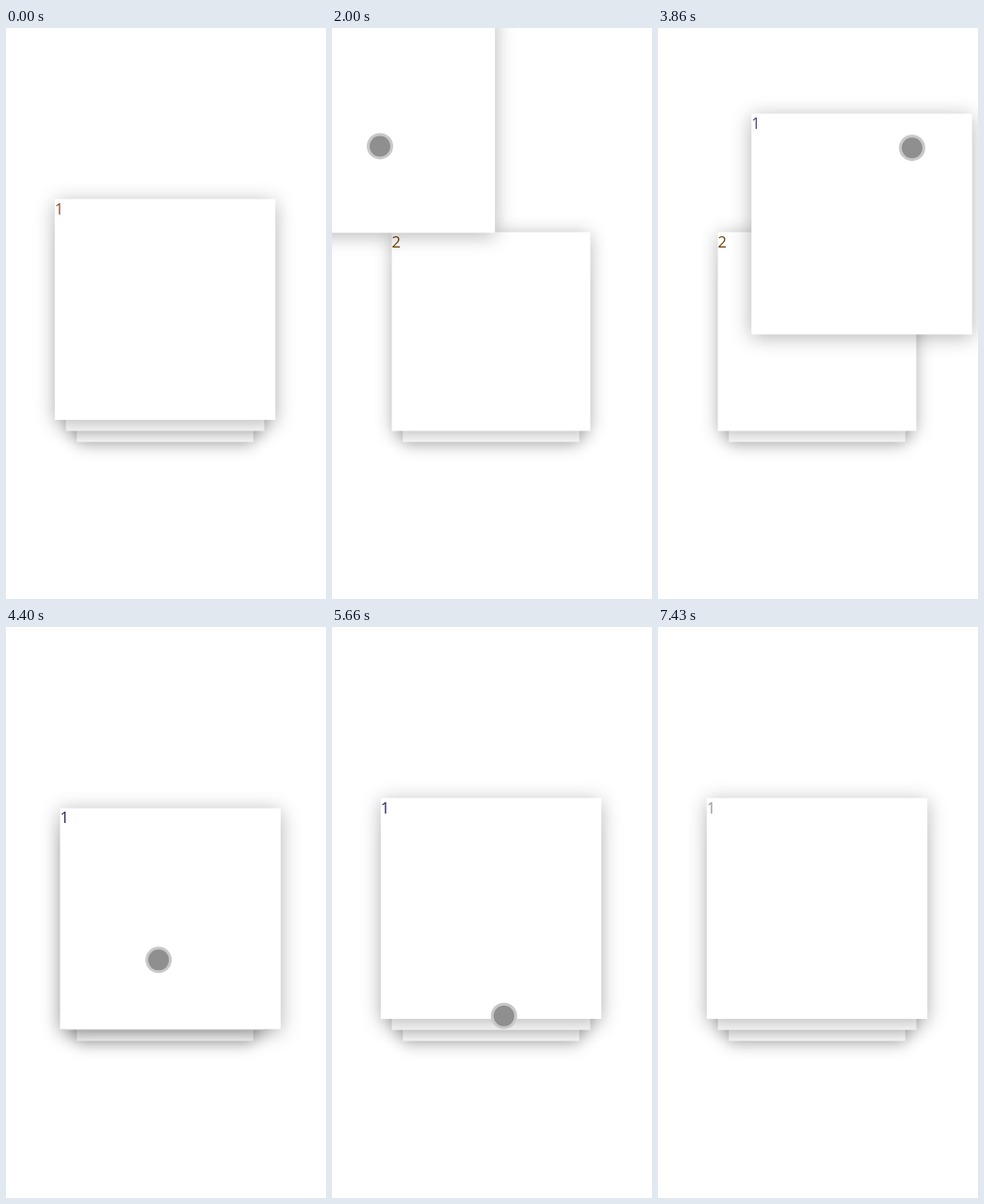
Recreate the animation shown at these times as an HTML page with a canvas. Size 340 by 606 pixels, loop 8210 ms.

```html
<!DOCTYPE html>
<html lang="en">
<head>
<meta charset="utf-8">
<title>Draggable card stack</title>
<style>
  html, body { margin: 0; width: 100%; height: 100%; overflow: hidden; background: #fff; }
  canvas { display: block; }
</style>
</head>
<body>
<canvas id="stage" width="340" height="606"></canvas>
<script>
const ctx = document.getElementById('stage').getContext('2d');
const LOOP = 8210, STEP = 77, RETURN_MS = 400;
const CARD = 234.4, CENTER_X = 169, CENTER_Y = 298.7;
const BROWN = '#96482e', OCHRE = '#6e4408', GRAY = '#999';

// Each drag: grab point, pull vector, and the times of press, full reach,
// release, and the pointer's arrival at the next grab point.
const drags = [
  { grab: [164, 324], pull: [-123, -216], down: 1240, reach: 2070, up: 2440, next: 2820, ink: '#777' },
  { grab: [144.5, 367], pull: [153, -292], down: 2930, reach: 3390, up: 3688, next: 4260, ink: '#4a4a82' },
  { grab: [156.5, 342.5], pull: [125.5, 242.5], down: 4320, reach: 4860, up: 5082, next: 5880, ink: '#26265c' },
  { grab: [150, 356], pull: [-161.5, 273.5], down: 5890, reach: 6314, up: 6700, ink: GRAY }
];

const mix = (a, b, k) => a.map((v, i) => v + (b[i] - v) * k);
const shift = (a, b, k) => a.map((v, i) => v + b[i] * k);

function ramp(t, start, end) {
  const u = Math.min(1, Math.max(0, (t - start) / (end - start)));
  return u * u * (3 - 2 * u);
}

// CSS "ease", cubic-bezier(.25, .1, .25, 1), solved by bisection
function ease(x) {
  if (x >= 1) return 1;
  let low = 0, high = 1, s;
  for (let i = 0; i < 24; i++) {
    s = (low + high) / 2;
    if (0.75 * s * (1 - s) + s ** 3 < x) low = s; else high = s;
  }
  return 0.3 * s * (1 - s) ** 2 + 3 * (1 - s) * s * s + s ** 3;
}

function approach(t) {
  let p = shift([213, 451], [-45, -132], ramp(t, 0, 370));
  p = shift(p, [5, -11], ramp(t, 460, 680));
  p = shift(p, [-9, 10], ramp(t, 840, 990));
  return shift(p, [0, 6], ramp(t, 1155, 1232));
}

function leave(t) {
  return shift([121, 552], [256, 96], (t - 7280) / 150);
}

function pointerAt(t, drag) {
  if (t >= 7280) return leave(t);
  if (!drag) return approach(t);
  const held = shift(drag.grab, drag.pull, ramp(t, drag.down, drag.reach));
  const following = drags[drags.indexOf(drag) + 1];
  return following ? mix(held, following.grab, ramp(t, drag.up, drag.next)) : held;
}

function cardOffset(t, drag) {
  if (!drag) return [0, 0];
  const back = t > drag.up ? ease((t - drag.up) / RETURN_MS) : 0;
  return shift([0, 0], drag.pull, ramp(t, drag.down, drag.reach) * (1 - back));
}

function drawCard(depth, [dx, dy], label, ink) {
  const scale = 1 - depth / 10, size = CARD * scale;
  const x = CENTER_X - size / 2 + dx;
  const y = CENTER_Y - size / 2 + depth * CARD / 10 + dy;
  ctx.save();
  ctx.shadowColor = 'rgba(0, 0, 0, .3)';
  ctx.shadowBlur = 20 * scale;
  ctx.shadowOffsetY = 3 * scale;
  ctx.fillStyle = '#fff';
  ctx.fillRect(x, y, size, size);
  ctx.restore();
  ctx.font = '16.5px "Open Sans", sans-serif';
  ctx.fillStyle = ink;
  ctx.fillText(label, x, y + 16);
}

function drawDisc([x, y], radius, color) {
  ctx.fillStyle = color;
  ctx.beginPath();
  ctx.arc(x, y, radius, 0, Math.PI * 2);
  ctx.fill();
}

function render() {
  const t = Math.floor(performance.now() % LOOP / STEP) * STEP;
  const drag = drags.filter(d => d.down <= t).pop();
  ctx.fillStyle = '#fff';
  ctx.fillRect(0, 0, 340, 606);
  drawCard(2, [0, 0], '', GRAY);
  drawCard(1, [0, 0], '2', drag === drags[3] ? GRAY : OCHRE);
  drawCard(0, cardOffset(t, drag), '1', drag ? drag.ink : BROWN);
  if (t >= STEP && t < 7390) {
    const pointer = pointerAt(t, drag);
    drawDisc(pointer, 14, '#c8c8c8');
    drawDisc(pointer, 11, '#8f8f8f');
  }
  requestAnimationFrame(render);
}
render();
</script>
</body>
</html>
```
